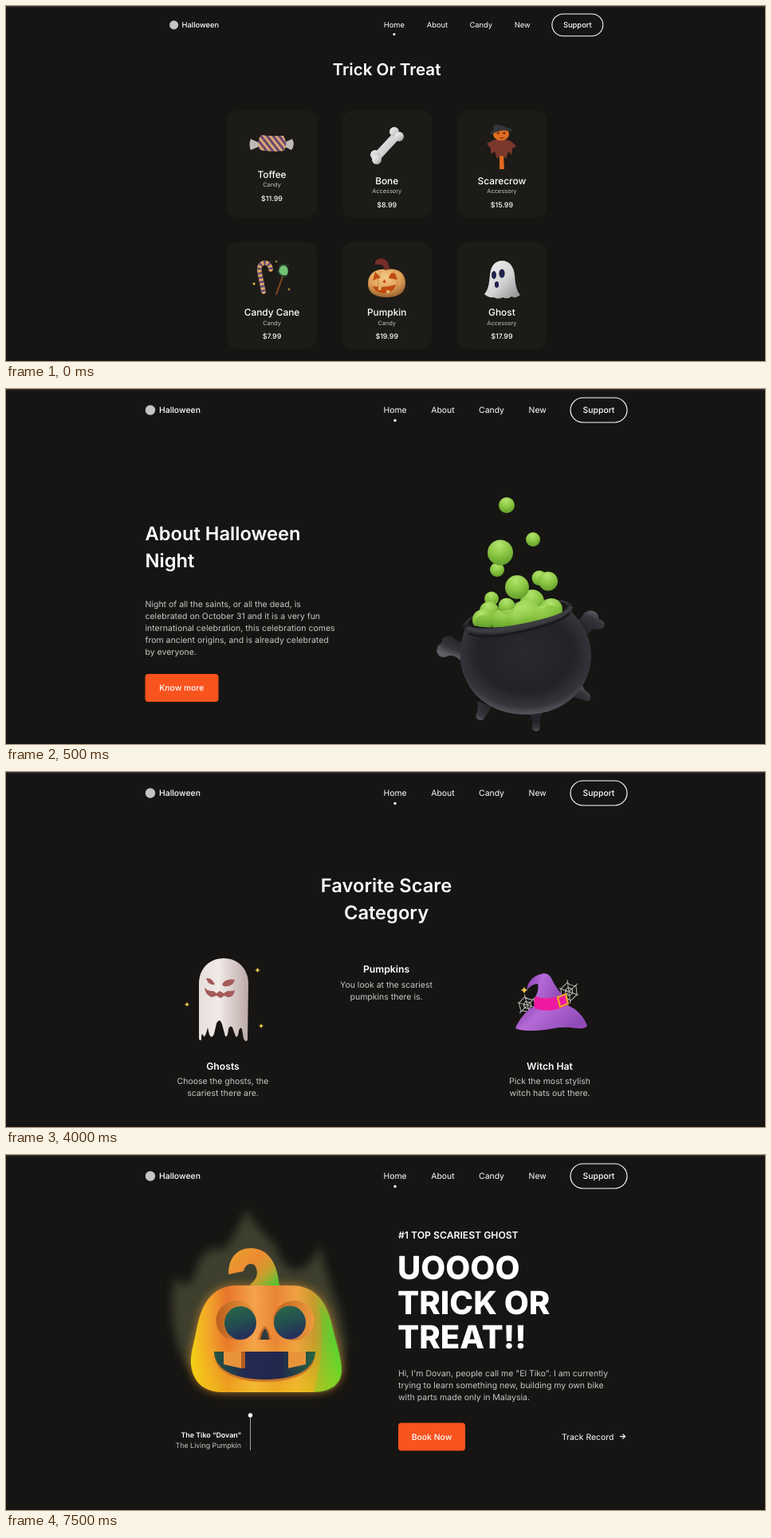
Animation of 952 by 446 pixels, one loop 8000 ms. Source, as an HTML page:

```html
<!DOCTYPE html>
<html lang="en">
<head>
<meta charset="utf-8">
<title>Halloween shop</title>
<style>
  html, body { margin: 0; width: 100%; height: 100%; overflow: hidden; background: #161513; }
  svg { display: block; width: 952px; height: 446px; }
  text { font-family: Inter, "Open Sans", sans-serif; font-size: 10.4px; fill: #fff; text-rendering: geometricPrecision; }
  .mid { text-anchor: middle; }
  .end { text-anchor: end; }
  .medium { font-weight: 500; }
  .semi { font-weight: 600; }
  .title { font-size: 23.7px; font-weight: 600; }
  .heading { font-size: 20.6px; font-weight: 600; }
  .kicker { font-size: 12.2px; font-weight: 600; }
  .label { font-size: 12.2px; font-weight: 600; }
  .copy { font-size: 10.5px; fill: #c8c7c5; }
  .small { font-size: 8.9px; }
  .product { font-size: 11.9px; font-weight: 500; }
  .kind { font-size: 7.4px; fill: #c1c0be; }
  .hero { font-size: 40.2px; font-weight: 800; }
  .button { fill: #f9531e; }
  .star { fill: #f0c64a; }
</style>
</head>
<body>
<svg viewBox="0 0 952 446">
  <defs>
    <radialGradient id="slime" cx=".45" cy=".2" r=".85">
      <stop stop-color="#b4e56f"/><stop offset=".5" stop-color="#8bc642"/><stop offset="1" stop-color="#5c9827"/>
    </radialGradient>
    <radialGradient id="iron" cx=".5" cy=".42" r=".6">
      <stop stop-color="#292a2d"/><stop offset=".6" stop-color="#222326"/><stop offset=".84" stop-color="#34353a"/><stop offset="1" stop-color="#5f6065"/>
    </radialGradient>
    <linearGradient id="rim" x2="0" y2="1">
      <stop stop-color="#4a4b4f"/><stop offset=".5" stop-color="#222326"/><stop offset="1" stop-color="#37383b"/>
    </linearGradient>
    <linearGradient id="sheet">
      <stop stop-color="#e6dedb"/><stop offset=".4" stop-color="#f1eae7"/><stop offset="1" stop-color="#bba9a7"/>
    </linearGradient>
    <linearGradient id="white" x2="1" y2="1">
      <stop stop-color="#f4f4f4"/><stop offset=".55" stop-color="#d2d2d3"/><stop offset="1" stop-color="#88898c"/>
    </linearGradient>
    <linearGradient id="felt" x2="1" y2=".4">
      <stop stop-color="#7e3aa8"/><stop offset=".4" stop-color="#b56ad6"/><stop offset="1" stop-color="#8f4bb6"/>
    </linearGradient>
    <linearGradient id="rind">
      <stop stop-color="#f3cf16"/><stop offset=".12" stop-color="#f2a32a"/><stop offset=".24" stop-color="#e8752c"/>
      <stop offset=".42" stop-color="#f5a34c"/><stop offset=".56" stop-color="#e98535"/><stop offset=".7" stop-color="#f0a143"/>
      <stop offset=".82" stop-color="#c69a2c"/><stop offset=".92" stop-color="#7bc230"/><stop offset="1" stop-color="#45d630"/>
    </linearGradient>
    <linearGradient id="rindBase" x2="0" y2="1">
      <stop offset=".5" stop-color="#f2d40c" stop-opacity="0"/><stop offset="1" stop-color="#f2d40c" stop-opacity=".5"/>
    </linearGradient>
    <linearGradient id="stem" x2="1" y2=".8">
      <stop stop-color="#e2a62c"/><stop offset=".45" stop-color="#ef8a33"/><stop offset=".75" stop-color="#c8a02e"/><stop offset="1" stop-color="#5fbf33"/>
    </linearGradient>
    <linearGradient id="hollow" x2=".3" y2="1">
      <stop stop-color="#286a48"/><stop offset=".55" stop-color="#23504f"/><stop offset="1" stop-color="#25305c"/>
    </linearGradient>
    <linearGradient id="throat">
      <stop stop-color="#22563f"/><stop offset=".3" stop-color="#232a52"/><stop offset=".65" stop-color="#21264c"/><stop offset="1" stop-color="#28663f"/>
    </linearGradient>
    <linearGradient id="socket">
      <stop stop-color="#b9601f"/><stop offset="1" stop-color="#ee9a3f"/>
    </linearGradient>
    <radialGradient id="gourd" cx=".45" cy=".3" r=".7">
      <stop stop-color="#f5c987"/><stop offset=".6" stop-color="#e0a158"/><stop offset="1" stop-color="#9c6330"/>
    </radialGradient>
    <pattern id="stripes" width="6" height="6" patternUnits="userSpaceOnUse" patternTransform="rotate(-38)">
      <rect width="6" height="6" fill="#dba574"/><rect width="3" height="6" fill="#66476f"/>
    </pattern>
    <filter id="soft" x="-30%" y="-30%" width="160%" height="160%"><feGaussianBlur stdDeviation="6"/></filter>
    <path id="spark" d="M0-4Q.7-.7 4 0Q.7.7 0 4Q-.7.7-4 0Q-.7-.7 0-4Z"/>
    <path id="web" fill="none" stroke="#bdbbb8" d="M-13 0H13M-7-12L7 12M7-12L-7 12M-5 0L-3-4H3L5 0L3 4H-3ZM-11 0L-6-9Q0-7 6-9L11 0L6 9Q0 7-6 9Z"/>
    <path id="body" d="M290 164C262 164 247 182 240 214C236 236 231 249 232 263C234 285 248 298 272 298H382C408 298 421 287 421 270C420 250 413 235 409 214C402 181 385 164 358 164Z"/>
    <path id="grin" d="M261 247H388C387 270 362 282 325 282C287 282 262 270 261 247Z"/>
    <g id="nav">
      <circle cx="181" cy="26.5" r="6.2" fill="#c4c4c6"/>
      <text x="192" y="30.2" class="medium">Halloween</text>
      <g class="mid">
        <text x="488" y="30.2">Home</text><text x="548" y="30.2">About</text>
        <text x="609" y="30.2">Candy</text><text x="666.7" y="30.2">New</text>
        <text x="743.5" y="30.2" class="medium">Support</text>
      </g>
      <circle cx="488" cy="39.5" r="1.7" fill="#fff"/>
      <rect x="708" y="11" width="71" height="31" rx="15.5" fill="none" stroke="#fff" stroke-width="1.15"/>
    </g>
  </defs>

  <rect width="952" height="446" fill="#161513"/>
  <rect width="952" height="1.4" fill="#343434"/>

  <g class="scene">
    <use href="#nav" transform="translate(47.7) scale(.9)"/>
    <text x="477.5" y="87" class="mid heading">Trick Or Treat</text>
    <g id="cards"></g>

    <g id="toffee">
      <path d="M318 172L307 167Q304 174 307 181L319 176ZM348 172L359 167Q363 174 358 181L348 176Z" fill="#bdbab8"/>
      <path d="M320 162Q334 164 348 163Q354 173 349 182Q334 184 318 181Q313 172 320 162Z" fill="url(#stripes)"/>
    </g>
    <g id="bone" fill="url(#white)">
      <path d="M487 158L494 166L469 193L461 186Z"/>
      <circle cx="487" cy="158" r="6"/><circle cx="493" cy="164" r="6"/>
      <circle cx="463" cy="187" r="6"/><circle cx="465" cy="193" r="6"/>
    </g>
    <g id="scarecrow">
      <path d="M619 188H624L625 205H619Z" fill="#dd6a1d"/>
      <path d="M603 173Q614 166 621 168Q632 166 640 176L635 179L634 187L630 183L627 192L622 187L616 192L613 183L608 186L608 179Z" fill="#7b382c"/>
      <ellipse cx="621" cy="161" rx="10" ry="8" fill="#df6c20"/>
      <path d="M615 160l3-2 1 3zM622 160l4-2 0 3zM616 164q5 3 10 0l-4 3z" fill="#5d2010"/>
      <path d="M608 162Q607 158 612 155Q610 148 616 149Q624 150 628 153Q636 154 634 158Q622 153 608 162Z" fill="#343537"/>
    </g>
    <g id="sweets" fill="none" stroke-linecap="round">
      <path d="M323 359L318 334C315 321 331 318 332 331" stroke="#dfa565" stroke-width="5.5"/>
      <path d="M323 359L318 334C315 321 331 318 332 331" stroke="#5e4d78" stroke-width="5.5" stroke-linecap="butt" stroke-dasharray="2.6 3"/>
      <path d="M347 340L339 362" stroke="#89441f" stroke-width="2"/>
      <ellipse cx="348" cy="333" rx="5.8" ry="7.5" fill="#72c271"/>
      <path d="M343 328Q345 323 354 326M341 333Q344 341 351 339" stroke="#263a2b" stroke-width="2"/>
      <g class="star">
        <use href="#spark" transform="translate(311 349) scale(.55)"/>
        <use href="#spark" transform="translate(339 321) scale(.4)"/>
        <use href="#spark" transform="translate(355 356) scale(.45)"/>
      </g>
    </g>
    <g id="gourdIcon">
      <path d="M454 349C454 335 465 329 478 331C493 328 502 337 501 350C500 361 491 366 478 366C464 366 454 361 454 349Z" fill="url(#gourd)"/>
      <path d="M470 333Q463 347 470 364M486 332Q495 347 488 364" fill="none" stroke="#b87b3e" opacity=".6"/>
      <path d="M475 332Q475 323 463 325Q462 318 470 317Q480 317 481 331Z" fill="#742d28"/>
      <path d="M460 345L463 334L470 341ZM480 342Q482 333 488 336L491 344ZM472 347L475 343L477 348ZM460 352Q474 355 489 350Q486 361 473 361Q463 360 460 352Z" fill="#c04a12"/>
      <path d="M467 353h4l-1 4h-3zM477 361v-4h4l1 3z" fill="#e8b26a"/>
    </g>
    <g id="ghostIcon">
      <path d="M600 362C606 355 606 346 607 338C608 326 614 320 622 320C632 320 637 328 638 338C639 350 640 357 645 363Q640 368 634 365Q629 369 623 366Q617 369 612 366Q605 367 600 362Z" fill="url(#white)"/>
      <g fill="#20214c"><ellipse cx="612" cy="338" rx="3" ry="5"/><ellipse cx="622" cy="336" rx="3.6" ry="5.6"/><ellipse cx="615.5" cy="350" rx="2.6" ry="4"/></g>
    </g>
  </g>

  <g class="scene">
    <use href="#nav"/>
    <text x="174.5" y="190" class="title">About Halloween</text>
    <text x="174.5" y="224" class="title">Night</text>
    <text x="174.5" y="274" class="copy">Night of all the saints, or all the dead, is</text>
    <text x="174.5" y="289" class="copy">celebrated on October 31 and it is a very fun</text>
    <text x="174.5" y="304" class="copy">international celebration, this celebration comes</text>
    <text x="174.5" y="319" class="copy">from ancient origins, and is already celebrated</text>
    <text x="174.5" y="334" class="copy">by everyone.</text>
    <rect x="174.5" y="358" width="92" height="35" rx="4" class="button"/>
    <text x="220.3" y="379.2" class="mid medium">Know more</text>

    <g id="cauldron">
      <g fill="url(#iron)">
        <path d="M591 392L608 399Q606 407 601 411Q600 417 594 416Q588 414 590 408Q593 402 591 392ZM655 404H674Q669 414 670 423Q670 430 665 430Q659 429 660 423Q661 414 655 404ZM711 386L723 373Q726 380 731 382Q735 386 732 391Q728 394 724 390Q718 390 711 386Z"/>
        <path d="M575 317Q565 318 561 312Q552 308 547 315Q547 320 542 322Q538 329 543 335Q549 339 555 335Q565 333 573 345ZM708 290Q718 295 724 283Q729 277 737 279Q744 282 743 289Q751 290 751 297Q747 304 738 301Q730 305 724 318Z"/>
      </g>
      <path d="M577 299C569 318 566 340 575 361C588 394 619 410 656 409C700 407 731 379 734 338C735 311 721 291 706 277Z" fill="url(#iron)"/>
      <g transform="rotate(-10.5 642 286)">
        <ellipse cx="642" cy="286" rx="70" ry="18" fill="url(#rim)"/>
        <ellipse cx="642" cy="283.5" rx="63" ry="13" fill="#17181a"/>
      </g>
      <clipPath id="opening"><path d="M570 100H705V272C703 280 693 285 666 292C635 299 606 302 586 297H570Z"/></clipPath>
      <g clip-path="url(#opening)" fill="url(#slime)">
        <g id="bubbles"></g>
        <path d="M588 300C586 288 596 280 606 286C614 276 628 280 636 276C646 264 664 268 672 276C684 268 696 274 698 284L670 300Z" opacity=".75"/>
      </g>
      <path d="M578 300C592 307 628 302 659 295C689 288 706 282 709 273" fill="none" stroke="#3c3d41" stroke-width="5"/>
      <path d="M580 307C596 315 631 309 661 301C689 294 703 287 707 281" fill="none" stroke="#191a1c" stroke-width="3"/>
    </g>
  </g>

  <g class="scene">
    <use href="#nav"/>
    <g class="mid">
      <text x="477" y="151" class="title">Favorite Scare</text>
      <text x="477" y="185" class="title">Category</text>
      <text x="477" y="252" class="label">Pumpkins</text>
      <text x="477" y="271" class="copy">You look at the scariest</text>
      <text x="477" y="286" class="copy">pumpkins there is.</text>
      <text x="272" y="373.7" class="label">Ghosts</text>
      <text x="272" y="392" class="copy">Choose the ghosts, the</text>
      <text x="272" y="407" class="copy">scariest there are.</text>
      <text x="682" y="373.7" class="label">Witch Hat</text>
      <text x="682" y="392" class="copy">Pick the most stylish</text>
      <text x="682" y="407" class="copy">witch hats out there.</text>
    </g>

    <g id="ghost">
      <path d="M242 335V266C242 246 256 234 273 234C291 234 304 247 304 266L303 337Q300 340 298 335L296 323Q294 319 292 325Q291 335 288 332L284 321Q281 317 279 323Q278 334 275 332L271 317Q268 308 264 316L261 329Q258 336 255 330L253 321Q250 334 248 332Q245 325 245 336Q243 339 242 335Z" fill="url(#sheet)"/>
      <g fill="#a45a58">
        <path d="M251 259Q258 258 262 267Q254 269 251 259ZM271 267Q275 259 287 261Q284 271 273 269Z"/>
        <path d="M249 271Q254 276 260 275L264 278L268 275L273 278L278 275Q284 276 287 274Q286 283 278 283L274 281L269 284L264 281L258 283Q250 280 249 271Z"/>
      </g>
      <g class="star">
        <use href="#spark" transform="translate(315.5 249) scale(.8)"/>
        <use href="#spark" transform="translate(227 292) scale(.75)"/>
        <use href="#spark" transform="translate(320 319) scale(.75)"/>
      </g>
    </g>
    <g id="hat">
      <use href="#web" transform="translate(654 293) rotate(15)"/>
      <use href="#web" transform="translate(706 276) rotate(20) scale(.98 1.1)"/>
      <path d="M640 319Q650 300 663 294L705 293Q722 301 729 318Q729 323 715 322Q700 319 682 323Q656 327 641 323Q638 322 640 319Z" fill="url(#felt)"/>
      <path d="M663 284Q669 275 667 266Q660 266 653 274Q655 257 674 253Q681 252 685 261Q690 272 700 282L701 292Q682 302 663 295Z" fill="url(#felt)"/>
      <path d="M664 282Q682 288 702 278Q706 286 704 293Q684 304 663 297Q661 289 664 282Z" fill="#ee1aa0"/>
      <path d="M692 283L702 279L705 291L695 295Z" fill="none" stroke="#e7a52d" stroke-width="2.4"/>
      <use href="#spark" class="star" transform="translate(650 274) scale(1.15)"/>
    </g>
  </g>

  <g class="scene">
    <use href="#nav"/>
    <text x="492" y="105" class="kicker">#1 TOP SCARIEST GHOST</text>
    <text x="491" y="156" class="hero">UOOOO</text>
    <text x="491" y="199.5" class="hero">TRICK OR</text>
    <text x="491" y="243" class="hero">TREAT!!</text>
    <text x="492" y="277.5" class="copy">Hi, I'm Dovan, people call me "El Tiko". I am currently</text>
    <text x="492" y="292.5" class="copy">trying to learn something new, building my own bike</text>
    <text x="492" y="307.5" class="copy">with parts made only in Malaysia.</text>
    <rect x="492" y="336.5" width="84" height="35" rx="4" class="button"/>
    <text x="534" y="357.6" class="mid medium">Book Now</text>
    <text x="697" y="357.6">Track Record</text>
    <path d="M770 353.6h6.5m-3-3l3 3l-3 3" fill="none" stroke="#fff" stroke-width="1.3"/>
    <text x="295" y="355" class="small semi end">The Tiko “Dovan”</text>
    <text x="295" y="367.7" class="small end" style="fill:#c8c7c5">The Living Pumpkin</text>
    <path d="M306.5 327V371" stroke="#a3a2a0"/>
    <circle cx="306.5" cy="327" r="2.7" fill="#fff"/>

    <g id="pumpkin">
      <path filter="url(#soft)" fill="#505139" opacity=".7" d="M230 268C206 235 205 180 213 152C224 172 232 165 240 140C247 118 262 114 272 120C281 112 292 88 303 68C313 96 337 105 343 126C350 145 366 150 378 138C386 130 392 122 394 110C398 150 421 185 426 240L420 270Z"/>
      <use href="#body" filter="url(#soft)" fill="#d08a2c" opacity=".8"/>
      <path d="M343 166C341 136 329 117 307 117C290 117 279 129 279 150L298 146C299 138 308 133 313 140C318 150 313 158 303 166Z" fill="url(#stem)"/>
      <use href="#body" fill="url(#rind)"/>
      <use href="#body" fill="url(#rindBase)"/>
      <path d="M391 185Q404 235 386 298H396Q421 294 421 270Q419 245 409 214Z" fill="#45d630" opacity=".3"/>
      <ellipse cx="289" cy="208" rx="25.5" ry="25" fill="url(#socket)"/>
      <ellipse cx="361" cy="208" rx="25.5" ry="25" fill="url(#socket)"/>
      <ellipse cx="294" cy="211" rx="20" ry="21" fill="url(#hollow)"/>
      <ellipse cx="356" cy="210.5" rx="20" ry="21" fill="url(#hollow)"/>
      <path d="M316 232Q319 217 325 215Q330 218 333 232Z" fill="#cd6d28"/>
      <path d="M319 232Q321 221 325 218Q329 222 330 232Z" fill="#313a3e"/>
      <use href="#grin" y="3" fill="#c9772a"/>
      <use href="#grin" fill="url(#throat)"/>
      <path d="M273 247H295V268L273 263ZM354 247H376V263L354 268Z" fill="#e8943b"/>
      <path d="M295 247H300V268H295Z" fill="#b25b20"/>
    </g>
  </g>
</svg>

<script>
const products = [
  ["Toffee", "Candy", "$11.99"], ["Bone", "Accessory", "$8.99"], ["Scarecrow", "Accessory", "$15.99"],
  ["Candy Cane", "Candy", "$7.99"], ["Pumpkin", "Candy", "$19.99"], ["Ghost", "Accessory", "$17.99"]
];

function card([name, kind, price], i) {
  const x = 277 + 144.2 * (i % 3), y = i < 3 ? 131.5 : 297;
  const mid = x + 56.5, base = y + (i ? 92 : 84);
  return `<rect x="${x}" y="${y}" width="113" height="134" rx="14" fill="#1c1b17"/>
    <g class="mid">
      <text x="${mid}" y="${base}" class="product">${name}</text>
      <text x="${mid}" y="${base + 11.5}" class="kind">${kind}</text>
      <text x="${mid}" y="${base + 29}" class="small medium">${price}</text>
    </g>`;
}
document.getElementById("cards").innerHTML = products.map(card).join("");

// x, y, radius, from back to front
const bubbles = [
  [628, 146, 10], [661, 189, 9], [616, 227, 9], [620, 205.5, 16], [669, 237.5, 9.5], [680, 241.5, 12],
  [660, 267, 15], [684, 277, 14], [609, 263.5, 9], [641, 249, 15], [652, 284, 19], [676, 286, 15],
  [606, 279, 12], [598, 290, 13], [624, 291, 15], [640, 292, 13], [628, 273, 10.5]
];
document.getElementById("bubbles").innerHTML =
  bubbles.map(([x, y, r]) => `<circle cx="${x}" cy="${y}" r="${r}"/>`).join("");

const scenes = document.querySelectorAll(".scene");
const cuts = [500, 4000, 7500];

function draw() {
  const time = performance.now() % 8000;
  const active = cuts.filter(cut => time >= cut).length;
  scenes.forEach((scene, i) => scene.style.display = i === active ? "" : "none");
  requestAnimationFrame(draw);
}
draw();
</script>
</body>
</html>
```
